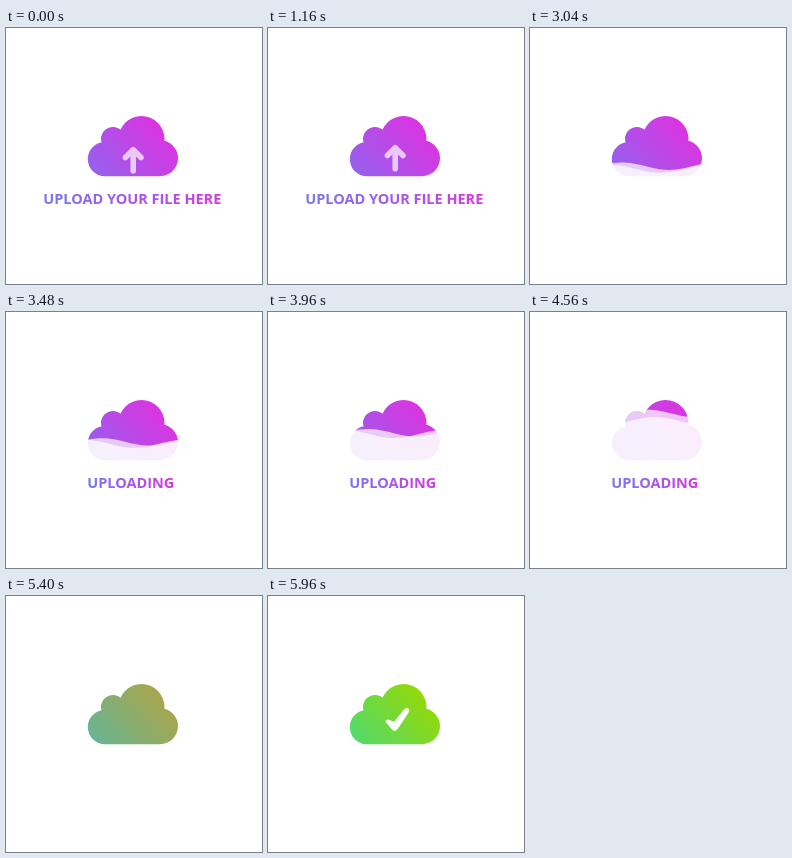
An HTML page that plays this animation: 256x256 px, repeating every 6760 ms.

```html
<!DOCTYPE html>
<html lang="en">
<head>
<meta charset="utf-8">
<title>Upload</title>
<style>
  html, body { margin: 0; width: 100%; height: 100%; overflow: hidden; background: #fff; }
  svg { display: block; width: 100%; height: 100%; }
  text { font: 700 14.5px "Open Sans", sans-serif; text-anchor: middle; }
</style>
</head>
<body>
<svg viewBox="0 0 256 256">
  <defs>
    <linearGradient id="violet" gradientUnits="userSpaceOnUse" x1="88" y1="152" x2="148" y2="98">
      <stop offset="0" stop-color="#9263ee"/><stop offset="1" stop-color="#d637e1"/>
    </linearGradient>
    <linearGradient id="green" gradientUnits="userSpaceOnUse" x1="86" y1="150" x2="152" y2="96">
      <stop offset="0" stop-color="#50da70"/><stop offset="1" stop-color="#92d80c"/>
    </linearGradient>
    <linearGradient id="ink">
      <stop offset="0" stop-color="#7777f0"/><stop offset="1" stop-color="#d638e0"/>
    </linearGradient>
    <mask id="shape" maskUnits="userSpaceOnUse" x="70" y="80" width="115" height="80">
      <path id="cloud" fill="#fff"/>
    </mask>
  </defs>
  <g mask="url(#shape)">
    <path d="M70 80H185V160H70Z" fill="url(#violet)"/>
    <g id="waves" fill="#fff" fill-opacity=".7">
      <path id="waveA"/>
      <path id="waveB"/>
    </g>
    <path id="done" d="M70 80H185V160H70Z" fill="url(#green)"/>
  </g>
  <path id="arrow" fill="none" stroke="#fff" stroke-width="5.6" stroke-linecap="round" stroke-linejoin="round"
    d="M119.4 129.6L127.2 121.8L135 129.6M127.2 123V142.8"/>
  <path id="check" fill="#fff" stroke="#fff" stroke-width=".6" stroke-linejoin="round"
    d="M117.6 125.4Q118.6 123.2 121 124L126 126.2L136.4 113.6Q139 111.2 140.6 112.8Q141.4 114.2 140 117L129.4 133Q126.8 136.2 124.2 133.4Z"/>
  <text id="prompt" x="126.3" y="176.1" fill="url(#ink)">UPLOAD YOUR FILE HERE</text>
  <text id="status" x="124.8" y="176.1" fill="url(#ink)">UPLOADING</text>
</svg>
<script>
const LOOP = 6760, STEP = 40;
const el = id => document.getElementById(id);
const ramp = (t, a, b) => Math.min(1, Math.max(0, (t - a) / (b - a)));
const ease = (t, a, b) => (1 - Math.cos(Math.PI * ramp(t, a, b))) / 2;
const fade = (id, v) => el(id).setAttribute('opacity', v);
const disc = (x, y, r) => `M${x - r} ${y}a${r} ${r} 0 0 1 ${2 * r} 0a${r} ${r} 0 0 1 ${-2 * r} 0Z`;

el('cloud').setAttribute('d',
  disc(98.9, 131.1, 17.1) + disc(107, 111, 12) + disc(135.5, 111, 23) +
  disc(154, 130.2, 18) + 'M98.9 114H154V148.2H98.9Z');

// Rows: time, then level and crest x for each wave
const rise = [
  [2600, 152, 88, 155, 182],
  [3040, 138.2, 92, 140.8, 180],
  [3960, 120.7, 100, 122, 176],
  [4560, 101.5, 118, 109, 125],
  [5120, 82, 138, 83, 100]
];

function pose(t) {
  let i = 0;
  while (i < rise.length - 2 && t > rise[i + 1][0]) i++;
  const p = rise[i], q = rise[i + 1], k = ramp(t, p[0], q[0]);
  return p.map((v, n) => v + (q[n] - v) * k);
}

function wave(level, crest, amp, length) {
  let d = 'M78 152';
  for (let x = 78; x <= 176; x += 2)
    d += `L${x} ${(level - amp * Math.cos((x - crest) * 2 * Math.PI / length)).toFixed(2)}`;
  return d + 'V152Z';
}

function draw(t) {
  const lift = ease(t, 80, 440) - ease(t, 840, 1320) + ease(t, 1760, 2280);
  el('arrow').setAttribute('transform', `translate(0 ${-8 * lift})`);
  const out = 1 - ramp(t, 2600, 2840);
  fade('arrow', 0.7 * out);
  fade('prompt', out);
  fade('status', ramp(t, 3040, 3280) * (1 - ramp(t, 4760, 5000)));

  const [, levelA, crestA, levelB, crestB] = pose(t);
  el('waveA').setAttribute('d', wave(levelA, crestA, 3.7, 94));
  el('waveB').setAttribute('d', wave(levelB, crestB, 4, 100));
  fade('waves', t >= 2600 && t < 5280 ? 1 : 0);

  fade('done', ease(t, 5200, 5520));
  fade('check', ramp(t, 5640, 5960));
}

const start = performance.now();
function tick() {
  const t = (performance.now() - start) % LOOP;
  draw(Math.floor(t / STEP) * STEP);
  requestAnimationFrame(tick);
}
tick();
</script>
</body>
</html>
```
